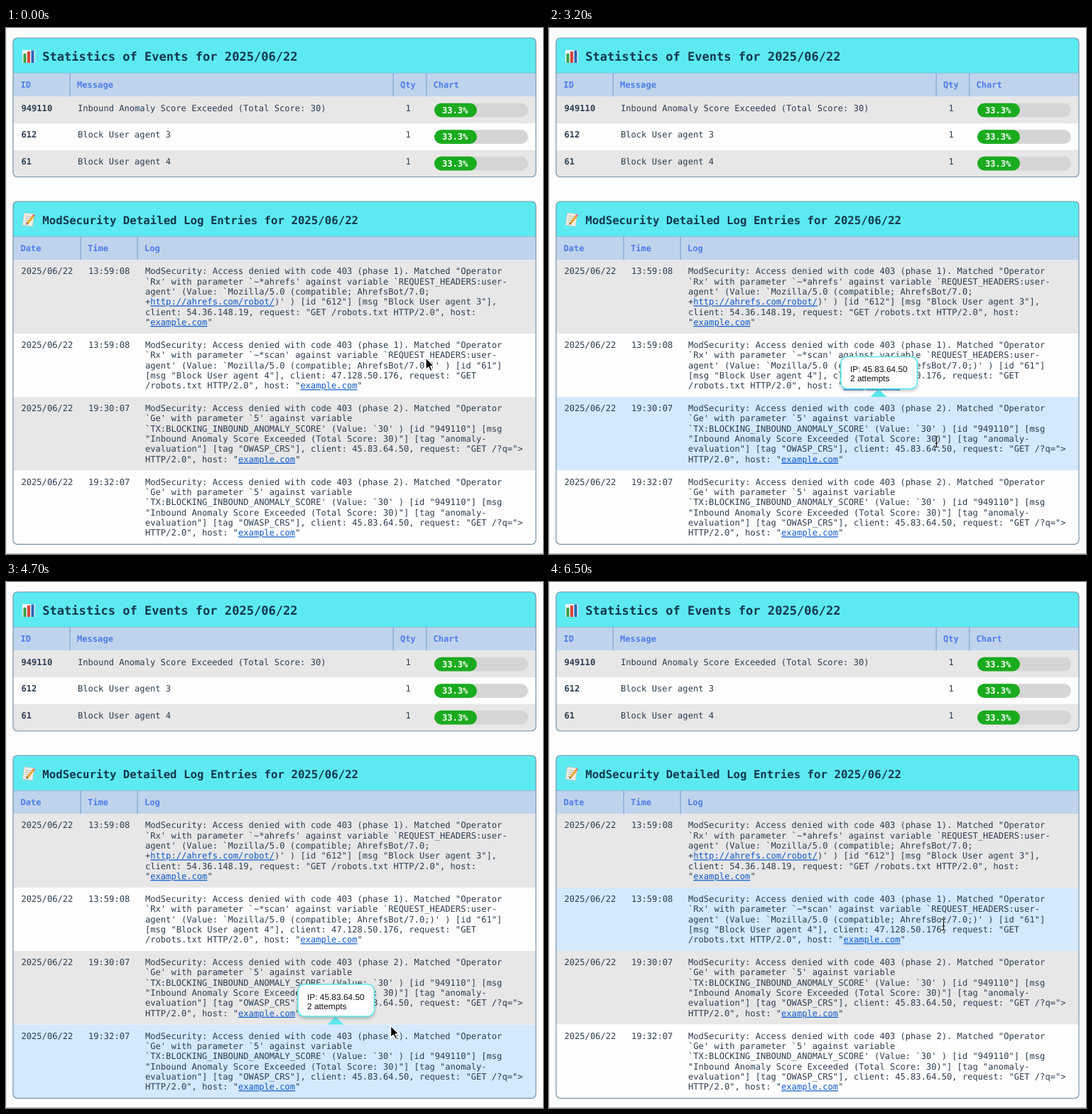
An HTML page for the animation above (6.6 s loop, 756 px wide and 740 px high).

```html
<!DOCTYPE html>
<html lang="en">
<head>
<meta charset="utf-8">
<title>Security event report</title>
<style>
html, body { margin: 0; width: 100%; height: 100%; overflow: hidden; background: #fdfdfd; }
svg { display: block; width: 756px; height: 740px; }
text { font: 12.1px "DejaVu Sans Mono", monospace; fill: #2b3d50; text-rendering: geometricPrecision; }
.bold { font-weight: bold; }
.head { font-weight: bold; fill: #4f7be9; }
.title { font-weight: bold; fill: #14384f; }
.pct { font-weight: bold; fill: #fff; }
.link { fill: #0b57c9; text-decoration: underline; }
#tip text { font: 11.9px "Liberation Sans", Arial, sans-serif; fill: #111; }
</style>
</head>
<body>
<svg id="stage" viewBox="0 0 756 740"></svg>
<script>
const LOOP = 6600, STEP = 100;
const LINE = 14.35, CHAR = 7.284, LOG_X = 196;
const CYAN = '#5ceaf0', GREY = '#e7e7e7', WHITE = '#fefefe', HOVER = '#d4e9fe';

const stats = [
  ['949110', 'Inbound Anomaly Score Exceeded (Total Score: 30)'],
  ['612', 'Block User agent 3'],
  ['61', 'Block User agent 4']
];

const denied = phase => `ModSecurity: Access denied with code 403 (phase ${phase}). Matched "Operator`;
const scoreLines = [
  denied(2),
  '`Ge\' with parameter `5\' against variable',
  '`TX:BLOCKING_INBOUND_ANOMALY_SCORE\' (Value: `30\' ) [id "949110"] [msg',
  '"Inbound Anomaly Score Exceeded (Total Score: 30)"] [tag "anomaly-',
  'evaluation"] [tag "OWASP_CRS"], client: 45.83.64.50, request: "GET /?q=">',
  'HTTP/2.0", host: "example.com"'
];
const logs = [
  { time: '13:59:08', lines: [
    denied(1),
    '`Rx\' with parameter `~*ahrefs\' against variable `REQUEST_HEADERS:user-',
    'agent\' (Value: `Mozilla/5.0 (compatible; AhrefsBot/7.0;',
    '+http://ahrefs.com/robot/)\' ) [id "612"] [msg "Block User agent 3"],',
    'client: 54.36.148.19, request: "GET /robots.txt HTTP/2.0", host:',
    '"example.com"'
  ] },
  { time: '13:59:08', lines: [
    denied(1),
    '`Rx\' with parameter `~*scan\' against variable `REQUEST_HEADERS:user-',
    'agent\' (Value: `Mozilla/5.0 (compatible; AhrefsBot/7.0;)\' ) [id "61"]',
    '[msg "Block User agent 4"], client: 47.128.50.176, request: "GET',
    '/robots.txt HTTP/2.0", host: "example.com"'
  ] },
  { time: '19:30:07', lines: scoreLines, repeated: true },
  { time: '19:32:07', lines: scoreLines, repeated: true }
];

let nextY = 326.4;
for (const log of logs) {
  log.y = nextY;
  log.h = log.lines.length * LINE + 17.4;
  nextY += log.h;
}

// Pointer path: time, x, y
const path = [
  [0, 591, 464], [1000, 611, 464], [2500, 563.5, 507.5], [3200, 545.5, 582],
  [3900, 541, 652], [4500, 539, 631], [5400, 559, 577.5], [6500, 555.5, 482]
];

const rect = (x, y, w, h, fill, extra = '') =>
  `<rect x="${x}" y="${y}" width="${w}" height="${h}" fill="${fill}" ${extra}/>`;
const linked = s => s.replace(/http:\/\/ahrefs\.com\/robot\/|example\.com/g, '<tspan class="link">$&</tspan>');
const text = (x, y, s, cls = '', extra = '') =>
  `<text x="${x}" y="${y}" class="${cls}" ${extra}>${linked(s)}</text>`;

function panel(id, y, h, title, size, columns, body) {
  const heads = columns.map(([x, label], i) =>
    (i ? rect(x - 10.6, y + 50, 1.6, 32.5, '#8fafd8') : '') + text(x, y + 69.5, label, 'head')).join('');
  return `<clipPath id="${id}">${rect(10, y, 736, h, '#000', 'rx="6"')}</clipPath>
    <g clip-path="url(#${id})">
      ${rect(10, y, 736, h, WHITE)}${rect(10, y, 736, 49.5, CYAN)}
      ${rect(10, y + 49.5, 736, 33, '#bfd4ec')}${rect(10, y + 49, 736, 1, '#91b9d6')}
      ${heads}${body}
    </g>
    ${rect(10, y, 736, h, 'none', 'rx="6" stroke="#7893aa" stroke-width="1.2"')}
    ${text(51.3, y + 31.5, title, 'title', `style="font-size:${size}px"`)}`;
}

const statRows = stats.map(([id, message], i) => {
  const y = 96.8 + i * 37.5;
  return rect(10, y, 736, 37.5, i % 2 ? WHITE : GREY) +
    text(21.5, y + 19.8, id, 'bold') + text(101, y + 19.8, message) + text(562.5, y + 19.8, '1') +
    rect(603, y + 9, 132, 19.6, '#d5d5d6', 'rx="9.8"') +
    rect(603, y + 9, 60, 19.6, '#1aab1e', 'rx="9.8"') +
    text(614, y + 23, '33.3%', 'pct');
}).join('');

const logRows = logs.map(({ y, h, time, lines }, i) =>
  rect(10, y, 736, h, WHITE, `id="row${i}"`) +
  text(21.5, y + 20, '2025/06/22') + text(116, y + 20, time) +
  lines.map((s, n) => text(LOG_X, y + 20 + n * LINE, s)).join('')).join('');

const chartIcon = rect(23, 31, 18, 18, '#eef3f5', 'rx="1"') +
  rect(24.5, 36, 4, 13, '#38a344') + rect(30, 33, 4, 16, '#d8433b') + rect(35.5, 31.5, 4, 17.5, '#2766b8');

const memoIcon = `<g transform="rotate(8 32 270)">
  ${rect(24.5, 261, 14, 17.5, '#f4efe6', 'stroke="#c9bfb0" stroke-width=".6"')}
  <path d="M27 265h8M27 268h7M27 271h5M27 274h4" stroke="#a7a9ac" stroke-width=".8"/>
  </g>
  <path d="M30 275 39 264" stroke="#eda52c" stroke-width="3"/>
  <path d="M38.5 264.6 40 262.7" stroke="#e2727c" stroke-width="3"/>
  <path d="M28.5 277 29 273.8 31.3 275.8Z" fill="#5d4531"/>`;

const tooltip = `<g id="tip">
  <path d="M464 508 475.5 519H452.5Z" fill="${CYAN}"/>
  ${rect(411, 462.5, 107.5, 45, '#fff', `rx="9" stroke="${CYAN}" stroke-width="1.6" filter="url(#shadow)"`)}
  ${text(424, 484, 'IP: 45.83.64.50')}${text(424, 497, '2 attempts')}
  </g>`;

const beam = 'M-3.2-8Q-.4-8 0-6.6Q.4-8 3.2-8M0-6.6V6.6M-3.2 8Q-.4 8 0 6.6Q.4 8 3.2 8M-1.8 2.2H1.8';
const pointers = `<g id="arrow"><path d="M0 0V16.4L3.8 12.9 6.3 18.6 9.1 17.4 6.7 11.8H11.8Z"
    stroke="#fff" stroke-width="1.4" stroke-linejoin="round"/></g>
  <g id="beam" fill="none"><path d="${beam}" stroke="#fff" stroke-width="2.4" opacity=".75"/>
    <path d="${beam}" stroke="#111" stroke-width="1.2"/></g>`;

document.getElementById('stage').innerHTML = `
  <defs><filter id="shadow" x="-20%" y="-30%" width="140%" height="170%">
    <feDropShadow dx="0" dy="2" stdDeviation="2.2" flood-color="#000" flood-opacity=".28"/></filter></defs>
  ${rect(0, 0, 756, 740, '#fdfdfd')}${rect(0, 0, 1, 740, '#e2e2e2')}${rect(0, 739, 756, 1, '#b4b4b4')}
  ${panel('statsClip', 14, 195.5, 'Statistics of Events for 2025/06/22', 17.06,
    [[20.5, 'ID'], [100, 'Message'], [555, 'Qty'], [601.5, 'Chart']], statRows)}
  ${panel('logsClip', 244, 482.3, 'ModSecurity Detailed Log Entries for 2025/06/22', 15.73,
    [[20.5, 'Date'], [115, 'Time'], [195, 'Log']], logRows)}
  ${chartIcon}${memoIcon}${tooltip}${pointers}`;

const part = id => document.getElementById(id);
const rows = logs.map((_, i) => part('row' + i));
const [tip, arrow, ibeam] = ['tip', 'arrow', 'beam'].map(part);
const show = (el, on) => el.setAttribute('visibility', on ? 'visible' : 'hidden');
const move = (el, x, y) => el.setAttribute('transform', `translate(${x} ${y})`);

function pointerAt(t) {
  const i = Math.max(1, path.findIndex(p => p[0] >= t));
  const [t0, x0, y0] = path[i - 1], [t1, x1, y1] = path[i];
  const u = (t - t0) / (t1 - t0), e = u * u * (3 - 2 * u);
  return [x0 + (x1 - x0) * e, y0 + (y1 - y0) * e];
}

function draw(t) {
  const [x, y] = pointerAt(t);
  // The page ignores the pointer until it first moves
  const hit = t > 0 ? logs.findIndex(l => y >= l.y && y < l.y + l.h) : -1;
  const log = logs[hit];
  rows.forEach((row, i) => row.setAttribute('fill', i === hit ? HOVER : i % 2 ? WHITE : GREY));

  const line = log && log.lines[Math.round((y - log.y - 16) / LINE)];
  const overText = !!line && x < LOG_X + line.length * CHAR;
  show(arrow, !overText);
  show(ibeam, overText);
  move(overText ? ibeam : arrow, x, y);

  show(tip, !!log && !!log.repeated);
  if (log) move(tip, 0, log.y - logs[2].y);
}

function tick(now) {
  draw(Math.floor(now % LOOP / STEP) * STEP);
  requestAnimationFrame(tick);
}
draw(0);
requestAnimationFrame(tick);
</script>
</body>
</html>
```
